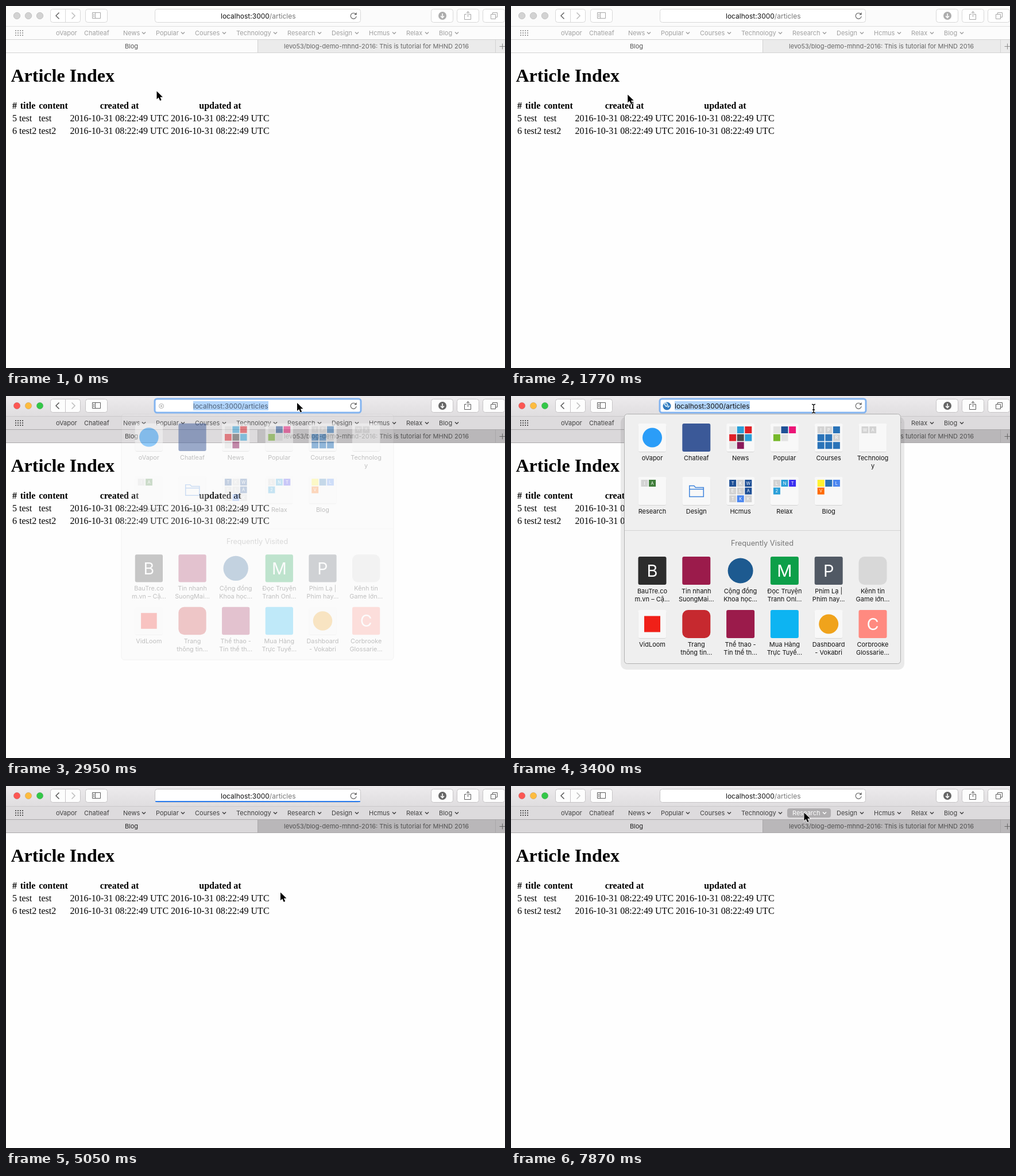
These frames come from a looping animation (869 px wide and 631 px high, 8000 ms). An HTML page:

```html
<!DOCTYPE html>
<html lang="en">
<head>
<meta charset="utf-8">
<title>Article Index</title>
<style>
  html, body { margin: 0; width: 100%; height: 100%; overflow: hidden; background: #fefefe; }
  svg { display: block; width: 869px; height: 631px; font: 11px Inter, sans-serif; }
  .page { font: 16px "Liberation Serif", serif; fill: #000; }
  .bold { font-weight: bold; }
</style>
</head>
<body>
<svg id="stage" viewBox="0 0 869 631"></svg>
<script>
const LOOP = 8000;
const stage = document.getElementById('stage');

// Bursts of discrete updates: first time, last time, number of steps.
const BURSTS = [
  [150, 1030, 7], [1320, 2360, 8], [2510, 2660, 2], [2950, 3400, 4], [4000, 4450, 4],
  [4750, 5650, 7], [5800, 6240, 4], [6530, 6970, 4], [7420, 7870, 4]
];

// Keyframes: time followed by values.
const POINTER = [
  [0, 262, 148], [150, 300, 200], [590, 728, 534], [1030, 172, 160], [1320, 180, 158],
  [1770, 203, 154], [2060, 330, 60], [2360, 498, 13], [2950, 506.5, 11.5], [3400, 527, 22],
  [4000, 527, 22], [4300, 798, 60], [4450, 780, 70], [5050, 477.5, 185], [5650, 452, 266],
  [6240, 82, 17], [6530, 85, 17], [6970, 121, 50], [7420, 112, 48], [7570, 200, 32],
  [7870, 510, 46]
];
const URL_LEFT = [[2360, 374], [2950, 326], [3400, 285], [4000, 300], [4450, 374]];
const POPOVER = [[2800, 0], [2950, .25], [3250, .85], [3400, 1], [3850, 1], [4000, .8], [4450, 0]];
const PROGRESS = [[4600, 0], [4750, .35], [5050, 1]];

const BOOKMARKS = [
  ['oVapor', 87], ['Chatleaf', 136], ['News', 204, 240], ['Popular', 261, 308],
  ['Courses', 329, 380], ['Technology', 401, 469], ['Research', 490, 546],
  ['Design', 567, 611], ['Hcmus', 632, 676], ['Relax', 697, 733], ['Blog', 754, 785]
];

const MINI_COLORS = {
  g: '#d3d3d3', b: '#1f5096', c: '#2a9fd8', r: '#df2027', k: '#4a4a4a', p: '#8a1a5a',
  m: '#ec1577', n: '#76b82a', o: '#2a73b8', d: '#3f7d3a', i: '#3a2ff0', l: '#4a86f0',
  y: '#fff22f', v: '#ff6a00', w: '#e2e2e2'
};

// Folder contents: letter (or dot) and colour code per cell, three cells a row.
const FOLDERS = [
  { name: 'oVapor', dot: '#2b9df8' },
  { name: 'Chatleaf', fill: '#3b5998' },
  { name: 'News', cells: '.w.c.r.r.k.c.w.p' },
  { name: 'Popular', cells: '.w.b.m.n.w' },
  { name: 'Courses', cells: 'IgPg.o.o.oRg.o.o.o' },
  { name: 'Technolog|y', cells: 'WgAg' },
  { name: 'Research', cells: 'IgAd' },
  { name: 'Design', folder: true },
  { name: 'Hcmus', cells: 'TbKgWbEgLgAbTgKlKg' },
  { name: 'Relax', cells: 'LgNcTi2c' },
  { name: 'Blog', cells: '.y.oLlVv' }
];
const SITES = [
  { name: 'BauTre.co|m.vn – Cậ...', fill: '#2c2c2c', letter: 'B' },
  { name: 'Tin nhanh|SuongMai...', fill: '#9b1b4b' },
  { name: 'Cộng đồng|Khoa học...', dot: '#1d5a90', bare: true },
  { name: 'Đọc Truyện|Tranh Onl...', fill: '#0d9f49', letter: 'M' },
  { name: 'Phim Lạ ||Phim hay...', fill: '#515964', letter: 'P' },
  { name: 'Kênh tin|Game lớn...', fill: '#d8d8d8', round: 10 },
  { name: 'VidLoom', square: '#f02018' },
  { name: 'Trang|thông tin...', fill: '#c6292f', round: 10 },
  { name: 'Thể thao -|Tin thể th...', fill: '#9b1b4b' },
  { name: 'Mua Hàng|Trực Tuyế...', fill: '#0db4f2' },
  { name: 'Dashboard|- Vokabri', dot: '#f0a31c' },
  { name: 'Corbrooke|Glossarie...', fill: '#ff8a80', letter: 'C' }
];

const rect = (x, y, w, h, fill, extra = '') =>
  `<rect x="${x}" y="${y}" width="${w}" height="${h}" fill="${fill}" ${extra}/>`;
const circle = (x, y, r, fill, extra = '') =>
  `<circle cx="${x}" cy="${y}" r="${r}" fill="${fill}" ${extra}/>`;
const line = (d, color, width = 1, extra = '') =>
  `<path d="${d}" fill="none" stroke="${color}" stroke-width="${width}" ${extra}/>`;
const text = (x, y, str, extra = '') => `<text x="${x}" y="${y}" ${extra}>${str}</text>`;
const MIDDLE = 'text-anchor="middle"';

function snap(t) {
  const burst = BURSTS.filter(b => b[0] <= t).pop();
  if (!burst) return 0;
  const [start, end, count] = burst;
  const gap = (end - start) / (count - 1);
  return start + gap * Math.min(count - 1, Math.floor((t - start + 1) / gap));
}

function valueAt(keys, t) {
  const next = keys.findIndex(k => k[0] > t);
  if (next === 0) return keys[0].slice(1);
  if (next < 0) return keys[keys.length - 1].slice(1);
  const a = keys[next - 1], b = keys[next], f = (t - a[0]) / (b[0] - a[0]);
  return a.slice(1).map((v, i) => v + (b[i + 1] - v) * f);
}

const between = (t, from, to) => t >= from - 1 && t < to - 1;

function page() {
  const stamp = '2016-10-31 08:22:49 UTC';
  const heads = [['#', 15], ['title', 38], ['content', 82.5], ['created at', 197.5], ['updated at', 373]];
  const rows = [['5', 'test', 201], ['6', 'test2', 223]];
  return '<g class="page">' +
    text(8.5, 132, 'Article Index', 'class="bold" font-size="32"') +
    heads.map(([s, x]) => text(x, 179, s, `class="bold" ${MIDDLE}`)).join('') +
    rows.map(([id, word, y]) =>
      text(11, y, id) + text(23, y, word) + text(57, y, word) +
      text(111.5, y, stamp) + text(287, y, stamp)).join('') + '</g>';
}

function toolbar(active) {
  const edge = active ? '#c6c4c6' : '#d8d8d8';
  const icon = active ? '#5c5c5c' : '#a6a6a6';
  const box = (x, w) => rect(x + .5, 5.5, w, 23, active ? '#fdfdfd' : '#fff', `rx="4" stroke="${edge}"`);
  const lights = active ? ['#fc5753', '#fdbc40', '#33c748'] : ['#d2d2d2', '#d2d2d2', '#d2d2d2'];
  const ring = active ? 'stroke="#000" stroke-opacity=".12"' : 'stroke="#c4c4c4"';
  let dots = '';
  for (let i = 0; i < 12; i++)
    dots += rect(16 + i % 4 * 4, 42 + Math.floor(i / 4) * 4, 2, 2, active ? '#555' : '#a0a0a0');
  return rect(0, 0, 869, 36, active ? 'url(#bar)' : '#fbfbfb') +
    rect(0, 36, 869, 22, active ? '#dddbdd' : '#fcfcfc') +
    rect(0, 35, 869, 1, active ? '#cbc9cb' : '#e0e0e0') +
    rect(0, 58, 869, 23, active ? '#dad8da' : '#fcfcfc') +
    rect(438, 58, 431, 23, active ? '#b9b7b9' : '#ebebeb') +
    [[0, 58, 869, 1], [0, 81, 869, 1], [438, 58, 1, 23], [852, 58, 1, 23]]
      .map(r => rect(...r, active ? '#a9a7a9' : '#d2d2d2')).join('') +
    lights.map((c, i) => circle(19 + 20 * i, 17, 5.7, c, ring)).join('') + dots +
    box(77, 52) + rect(103, 6, 1, 23, edge) + box(138, 38) + box(740, 38) + box(785, 38) + box(830, 38) +
    line('M92.5 11.5l-5.5 5.5 5.5 5.5', active ? '#555' : '#666', 1.5) +
    line('M114.5 11.5l5.5 5.5-5.5 5.5', '#bdbdbd', 1.5) +
    line('M150.5 11.5h14v10h-14zM155.5 11.5v10M152 14.5h2M152 16.5h2M152 18.5h2', icon) +
    circle(760, 17, 7, active ? '#666' : '#adadad') + line('M760 13v7M757 17.5l3 3 3-3', '#fff', 1.6) +
    line('M802 14.5h-3.5v9h11v-9h-3.5M804.5 19v-9M801.5 12.5l3-3 3 3', icon) +
    line('M847.5 14.5v-3h8v8h-3M844.5 14.5h8v8h-8z', icon) +
    line('M859.5 70.5h10M864.5 65.5v10', active ? '#666' : '#8a8a8a') +
    text(218.5, 74, 'Blog', `${MIDDLE} fill="${active ? '#222' : '#555'}"`) +
    text(645, 74, 'levo53/blog-demo-mhnd-2016: This is tutorial for MHND 2016',
      `${MIDDLE} fill="${active ? '#505050' : '#666'}"`);
}

function bookmarks(active, hovered) {
  return BOOKMARKS.map(([name, x, arrow]) => {
    const on = name === hovered;
    const color = on ? '#fff' : active ? '#404040' : '#a0a0a0';
    return (on ? rect(x - 9, 39, arrow - x + 20, 16, '#b0aeb0', 'rx="4"') : '') +
      text(x, 51, name, `fill="${color}"`) +
      (arrow ? line(`M${arrow - 3} 45.5l3 3 3-3`, color, 1.5) : '');
  }).join('');
}

function addressField(t, active) {
  const focused = between(t, 2360, 4300), selected = between(t, 2510, 4300);
  const sliding = between(t, 2510, 3100);
  const [x] = valueAt(URL_LEFT, t);
  const [done] = valueAt(PROGRESS, t);
  const host = sliding ? '#4d6078' : '#111';
  const path = selected ? host : '#777';
  let out = focused ? rect(259, 5, 359, 24, '#fff', 'rx="4" stroke="#83b4f0" stroke-width="3"')
    : rect(259.5, 5.5, 358, 23, '#fff', `rx="4" stroke="${active ? '#c6c4c6' : '#d8d8d8'}"`);
  if (selected) out += rect(x, 9, 131, 16, '#b2d5fb');
  if (sliding)
    out += circle(270.5, 17.5, 4, 'none', 'stroke="#aaa"') + line('M268.5 17.5h4M270.5 15.5v4', '#aaa');
  if (between(t, 3100, 4300))
    out += circle(271.5, 17.5, 7, '#2f78bd') + line('M267 14q3-4 5 0t-2 4zM273 20l3-3', '#c4e0f0', 2);
  if (between(t, 4750, 5350)) out += rect(260, 26, 357 * done, 2, '#2a7df0', 'rx="1"');
  return out + text(x, 22, `localhost:3000<tspan fill="${path}">/articles</tspan>`, `font-size="12" fill="${host}"`) +
    line('M609.2 14.2a5 5 0 1 0 1 3.8', '#666', 1.2) + '<path d="M610.6 11v4.4h-4.4z" fill="#666"/>';
}

function miniIcons(cells, x, y) {
  let out = '';
  for (let i = 0; i < cells.length / 2; i++) {
    const cx = x + 5 + i % 3 * 13.6, cy = y + 5 + Math.floor(i / 3) * 13.6;
    const letter = cells[2 * i];
    out += rect(cx, cy, 12, 12, MINI_COLORS[cells[2 * i + 1]]);
    if (letter !== '.') out += text(cx + 6, cy + 8.7, letter, `${MIDDLE} font-size="7.5" fill="#fff"`);
  }
  return out;
}

function tile(item, x, y) {
  const plain = !item.fill && !item.bare;
  let out = plain ? rect(x, y + 1, 49, 49, '#d4d4d4', 'rx="4"') : '';
  if (!item.bare) out += rect(x, y, 49, 49, item.fill || '#f8f8f8', `rx="${item.round || 3}"`);
  if (item.letter)
    out += text(x + 24.5, y + 35, item.letter, `${MIDDLE} font-size="29" fill="#fff"`);
  if (item.dot) out += circle(x + 24.5, y + 24.5, item.bare ? 22 : 17, item.dot);
  if (item.square) out += rect(x + 10.5, y + 10.5, 28, 28, item.square);
  if (item.folder)
    out += line(`M${x + 12.5} ${y + 15.5}h8l2.5 3h14v16h-24.5zM${x + 12.5} ${y + 21.5}h24.5`, '#3f84dc', 1.5);
  if (item.cells) out += miniIcons(item.cells, x, y);
  return out;
}

function tileGrid(items, tops, alpha) {
  return items.map((item, i) => {
    const cx = 246 + 76.8 * (i % 6), top = tops[Math.floor(i / 6)];
    const shown = top === 48 ? Math.sqrt(alpha) : alpha;
    const caption = item.name.replace('||', '¦|').split('|')
      .map((s, n) => text(cx, top + 64 + 14 * n, s.replace('¦', '|'), `${MIDDLE} fill="#111"`)).join('');
    return `<g opacity="${shown}">${tile(item, cx - 24.5, top)}</g><g opacity="${alpha}">${caption}</g>`;
  }).join('');
}

function popover(t) {
  const [alpha] = valueAt(POPOVER, t);
  if (alpha < .01) return '';
  const scale = .98 + .02 * alpha;
  return `<g transform="translate(438 31) scale(${scale}) translate(-438 -31)">` +
    // The backing and its halo settle in later than the contents.
    `<g opacity="${alpha ** 1.4}">` +
    rect(191, 36, 494, 441, '#000', `rx="10" opacity="${.08 * alpha}"`) +
    rect(197.5, 31.5, 481, 435, '#efefef', 'rx="5" stroke="#b0b0b0"') +
    rect(198, 234, 480, 1, '#d4d4d4') + '</g>' +
    text(437.5, 261, 'Frequently Visited', `${MIDDLE} font-size="12.8" fill="#777" opacity="${alpha}"`) +
    tileGrid(FOLDERS, [48, 141], alpha) + tileGrid(SITES, [280, 373], alpha) + '</g>';
}

function pointer(t) {
  const [x, y] = valueAt(POINTER, t);
  if (between(t, 3250, 4150)) {
    const beam = 'M-3-7.5q3 0 3 2v11q0 2-3 2M3-7.5q-3 0-3 2v11q0 2 3 2M-2 2h4';
    return `<g transform="translate(${x} ${y})">${line(beam, '#fff', 3)}${line(beam, '#000', 1.3)}</g>`;
  }
  return `<path transform="translate(${x} ${y})" d="M.5 .5v14l3.2-3 2.5 5.5 2.5-1.1-2.4-5.2h4.6z" ` +
    'fill="#000" stroke="#fff" stroke-width="1.6" paint-order="stroke"/>';
}

function scene(t) {
  const active = t >= 2050;
  return '<defs><linearGradient id="bar" x2="0" y2="1"><stop stop-color="#edebed"/>' +
    '<stop offset="1" stop-color="#dfdddf"/></linearGradient></defs>' +
    rect(0, 0, 869, 631, '#fefefe') + page() + toolbar(active) +
    bookmarks(active, between(t, 7870, LOOP) ? 'Research' : '') +
    addressField(t, active) + popover(t) + pointer(t);
}

let shownTime = -1;
function frame(now) {
  const t = snap(now % LOOP);
  if (t !== shownTime) stage.innerHTML = scene(shownTime = t);
  requestAnimationFrame(frame);
}
frame(performance.now());
</script>
</body>
</html>
```
